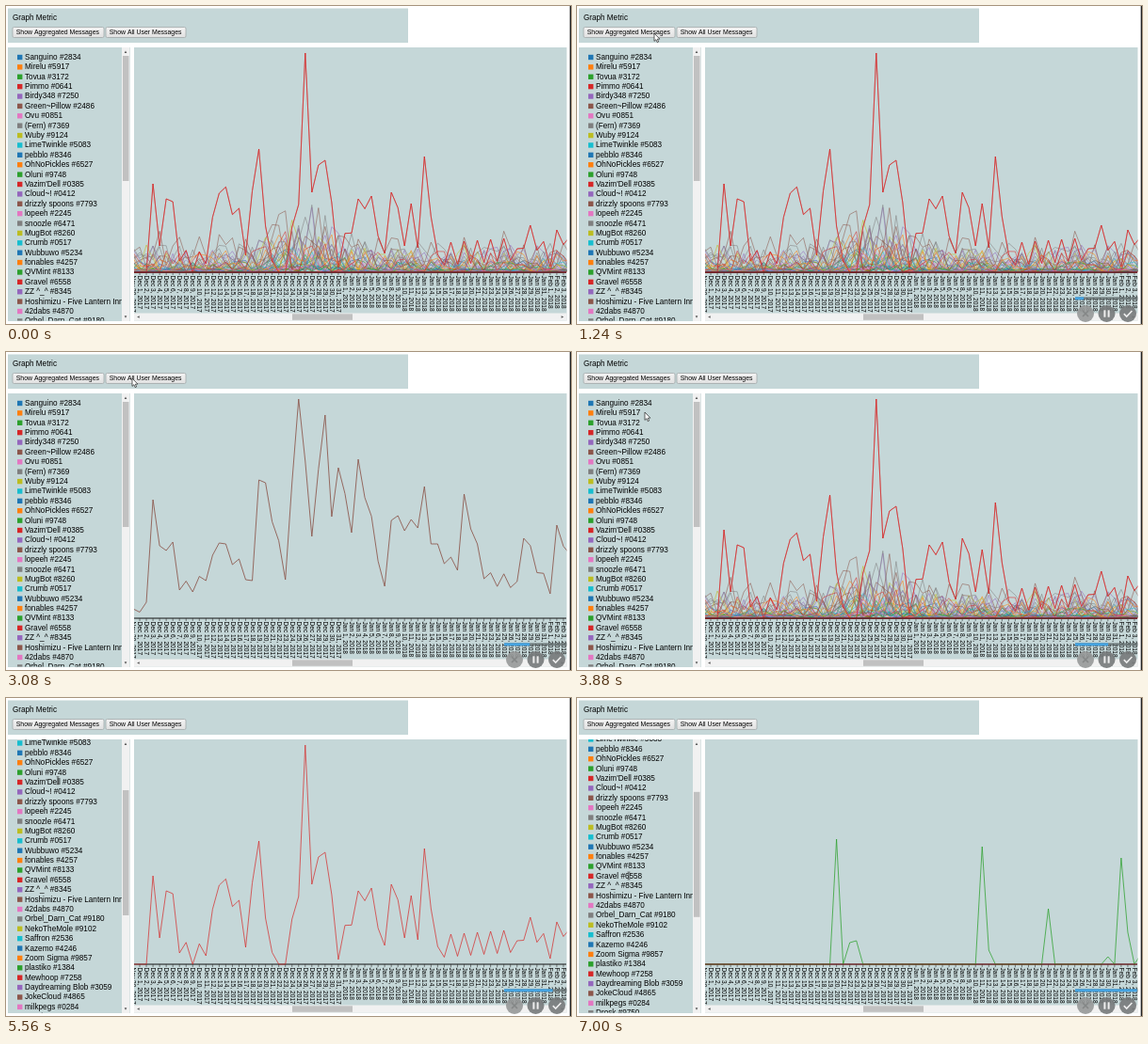
Recreate the animation shown at these times as an HTML page with a canvas. Size 600 by 338 pixels, loop 7080 ms.

```html
<!DOCTYPE html>
<html lang="en">
<head>
<meta charset="utf-8">
<title>Graph Metric</title>
<style>
html, body { margin: 0; width: 100%; height: 100%; overflow: hidden; background: #fff; }
canvas { display: block; width: 600px; height: 338px; }
</style>
</head>
<body>
<canvas id="stage"></canvas>
<script>
const W = 600, H = 338, LOOP = 7080;
const PANEL = '#c5d7d8', INK = '#000';
const SANS = '"Liberation Sans", Arial, sans-serif';
const COLORS = ['#1f77b4', '#ff7f0e', '#2ca02c', '#d62728', '#9467bd',
  '#8c564b', '#e377c2', '#7f7f7f', '#bcbd22', '#17becf'];
const USERS = ['Sanguino #2834', 'Mirelu #5917', 'Tovua #3172', 'Pimmo #0641',
  'Birdy348 #7250', 'Green~Pillow #2486', 'Ovu #0851', '(Fern) #7369', 'Wuby #9124',
  'LimeTwinkle #5083', 'pebblo #8346', 'OhNoPickles #6527', 'Oluni #9748',
  "Vazim'Dell #0385", 'Cloud~! #0412', 'drizzly spoons #7793', 'lopeeh #2245',
  'snoozle #6471', 'MugBot #8260', 'Crumb #0517', 'Wubbuwo #5234', 'fonables #4257',
  'QVMint #8133', 'Gravel #6558', 'ZZ ^_^ #8345', 'Hoshimizu - Five Lantern Inn #2071',
  '42dabs #4870', 'Orbel_Darn_Cat #9180', 'NekoTheMole #9102', 'Saffron #2536',
  'Kazemo #4246', 'Zoom Sigma #9857', 'plastiko #1384', 'Mewhoop #7258',
  'Daydreaming Blob #3059', 'JokeCloud #4865', 'milkpegs #0284', 'Drosk #9750'];
const TOP_USER = 3;

// Chart geometry: one point per day, day 0 is Nov 30.
const DAYS = 67, BASE = 283, STEP = 7.03;
const dayX = i => 135 + i * STEP;
const byDay = fn => Array.from({ length: DAYS }, (_, i) => fn(i));

function rng(seed) {
  return () => {
    seed = (seed * 1664525 + 1013904223) >>> 0;
    return seed / 4294967296;
  };
}

// Straight runs between key days; the days in between zigzag by `rough`.
function outline(keys, rough) {
  return byDay(i => {
    const n = keys.findIndex(([day]) => day >= i);
    const [d1, y1] = keys[n];
    if (d1 === i) return y1;
    const [d0, y0] = keys[n - 1];
    const y = y0 + (y1 - y0) * (i - d0) / (d1 - d0);
    return Math.min(BASE, y + (i % 2 ? rough : -rough));
  });
}

const total = outline([[0, 273], [2, 266], [3, 157], [4, 206], [6, 202], [7, 253], [11, 243],
  [13, 203], [18, 243], [19, 136], [20, 139], [23, 242], [25, 50], [27, 196], [29, 67],
  [30, 175], [31, 123], [33, 192], [34, 114], [38, 249], [39, 179], [43, 187], [44, 143],
  [45, 204], [49, 232], [50, 151], [53, 241], [58, 244], [59, 198], [63, 257], [64, 184],
  [66, 215]], 7);

const topUser = outline([[0, 283], [2, 283], [3, 189], [4, 255], [5, 205], [6, 208], [7, 271],
  [11, 274], [13, 199], [16, 215], [17, 265], [19, 152], [20, 234], [22, 283], [23, 283],
  [25, 211], [26, 50], [27, 198], [29, 164], [31, 278], [34, 205], [36, 202], [38, 263],
  [39, 198], [41, 255], [42, 210], [43, 257], [44, 160], [46, 264], [58, 258], [60, 233],
  [63, 277], [64, 238], [66, 245]], 12);

const greenPeaks = new Map([[20, 150], [22, 260], [23, 258], [42, 158], [43, 268], [52, 224],
  [61, 275], [63, 170], [64, 249], [66, 272]]);
const greenUser = byDay(i => greenPeaks.get(i) || BASE);

// Most users hardly write; a few, mainly the brown and gray ones, are loud.
function crowd() {
  const rand = rng(2018);
  return USERS.map((_, k) => {
    const loud = k % 10 === 5 || k % 10 === 7 ? 18 : 0;
    const size = 5 + loud + 42 * Math.pow(rand(), 4);
    return byDay(i => {
      const busy = 0.7 + Math.exp(-Math.pow((i - 26) / 6, 2));
      return BASE - size * busy * Math.pow(rand(), 1.5);
    });
  });
}
const series = crowd();
series[TOP_USER] = topUser;

const DATE = new Intl.DateTimeFormat('en-US',
  { month: 'short', day: 'numeric', year: 'numeric', timeZone: 'UTC' });
const LABELS = byDay(i => DATE.format(Date.UTC(2017, 10, 30 + i)));

const canvas = document.getElementById('stage');
const g = canvas.getContext('2d');
const dpr = window.devicePixelRatio || 1;
canvas.width = W * dpr;
canvas.height = H * dpr;

function rect(x, y, w, h, color) {
  g.fillStyle = color;
  g.fillRect(x, y, w, h);
}

function text(s, x, y, size) {
  g.font = `${size}px ${SANS}`;
  g.textBaseline = 'middle';
  g.fillStyle = INK;
  g.fillText(s, x, y);
}

function trace(points) {
  g.beginPath();
  points.forEach(([x, y]) => g.lineTo(x, y));
}

function path(points, color, width) {
  trace(points);
  g.strokeStyle = color;
  g.lineWidth = width;
  g.stroke();
}

function poly(points, color) {
  trace(points);
  g.closePath();
  g.fillStyle = color;
  g.fill();
}

// Scrollbar arrow pointing along (dx, dy).
function arrow(x, y, dx, dy) {
  poly([[x + dx, y + dy], [x - dx - dy, y - dy - dx], [x - dx + dy, y - dy + dx]].map(
    ([px, py]) => [x + (px - x) * 1.3, y + (py - y) * 1.3]), '#555');
}

function clipped(x, y, w, h, draw) {
  g.save();
  g.beginPath();
  g.rect(x, y, w, h);
  g.clip();
  draw();
  g.restore();
}

// Eased value through [time, value...] keys.
function track(keys, t) {
  const n = keys.findIndex(key => key[0] > t);
  if (n === 0) return keys[0].slice(1);
  if (n < 0) return keys[keys.length - 1].slice(1);
  const a = keys[n - 1], b = keys[n];
  const p = (t - a[0]) / (b[0] - a[0]), e = p * p * (3 - 2 * p);
  return a.slice(1).map((v, i) => v + (b[i + 1] - v) * e);
}

const POINTER = [[560, 240, 130], [1120, 82, 29], [2480, 82, 29], [2900, 134, 28],
  [3240, 134, 28], [3800, 72, 64], [4200, 72, 64], [4640, 55, 86], [5840, 55, 88],
  [6280, 55, 180], [6360, 55, 180], [6520, 55, 189]];
const SCROLL = [[5200, 0], [5500, 100], [5840, 100], [6000, 104]];

function mode(t) {
  if (t < 1520) return 'all';
  if (t < 3160) return 'total';
  if (t < 5080) return 'all';
  return t < 6400 ? 'top' : 'green';
}

function button(x, w, label) {
  const fade = g.createLinearGradient(0, 22, 0, 34);
  fade.addColorStop(0, '#f4f4f4');
  fade.addColorStop(1, '#e0e0e0');
  g.beginPath();
  g.roundRect(x, 22.5, w, 11, 1.5);
  g.fillStyle = fade;
  g.fill();
  g.strokeStyle = '#a3a9aa';
  g.lineWidth = 0.8;
  g.stroke();
  text(label, x + 3.7, 28.4, 6.92);
}

function legend(scroll) {
  rect(2, 44, 130, 291, PANEL);
  clipped(2, 44, 121, 290.5, () => {
    USERS.forEach((name, k) => {
      const y = 54.5 + k * 10.385 - scroll;
      rect(12, y - 2.7, 5.4, 5.4, COLORS[k % 10]);
      text(name, 20, y + 0.2, 8.2);
    });
  });
  rect(123, 44, 8.5, 291, '#f1f1f1');
  rect(124, 53 + scroll * 0.45, 6.5, 133, '#c1c1c1');
  arrow(127, 48.7, 0, -1);
  arrow(127, 330.5, 0, 1);
}

function line(ys, color, width) {
  path(ys.map((y, i) => [dayX(i), y]), color, width);
}

function axis() {
  path([[136, BASE], [595, BASE]], '#111', 1);
  LABELS.forEach((label, i) => {
    path([[dayX(i), BASE], [dayX(i), BASE + 3]], '#333', 0.6);
    g.save();
    g.translate(dayX(i), 286.5);
    g.rotate(Math.PI / 2);
    text(label, 0, 0, 6.6);
    g.restore();
  });
}

const VIEWS = {
  all() {
    series.forEach((ys, k) => line(ys, COLORS[k % 10], 0.55));
    line(topUser, COLORS[TOP_USER], 0.65);
    path([[136, BASE], [595, BASE]], '#6b1a1d', 1.4);
  },
  total() { line(total, COLORS[5], 0.85); },
  top() { line(topUser, COLORS[TOP_USER], 0.7); },
  green() {
    line(greenUser, COLORS[2], 0.75);
    path([[136, BASE], [595, BASE]], '#a01c20', 0.8);
  }
};

function chart(view) {
  rect(136, 44, 459.5, 290.5, PANEL);
  clipped(136, 44, 459.5, 283, () => {
    axis();
    VIEWS[view]();
  });
  rect(136, 326.5, 459.5, 8, '#f1f1f1');
  rect(304, 327.3, 64, 6.5, '#c1c1c1');
  arrow(140.4, 330.5, -1, 0);
  arrow(591, 330.5, 1, 0);
}

function disc(x, color) {
  g.beginPath();
  g.arc(x, 327, 9, 0, Math.PI * 2);
  g.fillStyle = color;
  g.fill();
}

function recorder(t) {
  const done = Math.max(0, (t - 300) / (LOOP - 300));
  g.save();
  g.globalAlpha = Math.min(1, (t - 80) / 160);
  rect(529, 309.3, 66.5, 3, 'rgba(95,104,106,.75)');
  rect(529, 309.3, 66.5 * done, 3, '#45a3e0');
  disc(540, 'rgba(150,152,152,.9)');
  disc(562.5, 'rgba(118,121,122,.9)');
  disc(585, 'rgba(118,121,122,.9)');
  path([[537, 324], [543, 330]], '#858787', 1.6);
  path([[543, 324], [537, 330]], '#858787', 1.6);
  rect(559.4, 323.3, 2, 7.4, '#eee');
  rect(563.6, 323.3, 2, 7.4, '#eee');
  path([[580.8, 327.2], [583.7, 330], [589.4, 324]], '#eee', 1.6);
  g.restore();
}

function pointer(x, y, beam) {
  if (beam) {
    path([[x, y - 4], [x, y + 4]], '#333', 0.7);
    for (const end of [y - 4, y + 4]) path([[x - 1.5, end], [x + 1.5, end]], '#333', 0.6);
    return;
  }
  const shape = [[0, 0], [0, 8.4], [1.9, 6.7], [3.2, 9.6], [4.6, 9], [3.3, 6.2], [5.9, 6.1]]
    .map(([dx, dy]) => [x + dx, y + dy]);
  poly(shape, '#fff');
  path([...shape, shape[0]], '#222', 0.7);
}

let start;
function frame(now) {
  start ??= now;
  const t = (now - start) % LOOP;
  g.setTransform(dpr, 0, 0, dpr, 0, 0);
  g.miterLimit = 4;
  rect(0, 0, W, H, '#fff');
  rect(598.7, 0, 1.3, H, '#222');
  rect(2, 2.5, 425, 36.6, PANEL);
  text('Graph Metric', 7, 12.8, 8.13);
  button(7, 97, 'Show Aggregated Messages');
  button(106, 85, 'Show All User Messages');
  legend(track(SCROLL, t)[0]);
  chart(mode(t));
  if (t >= 80) recorder(t);
  if (t >= 560) pointer(...track(POINTER, t), t > 4440);
  requestAnimationFrame(frame);
}
requestAnimationFrame(frame);
</script>
</body>
</html>
```
